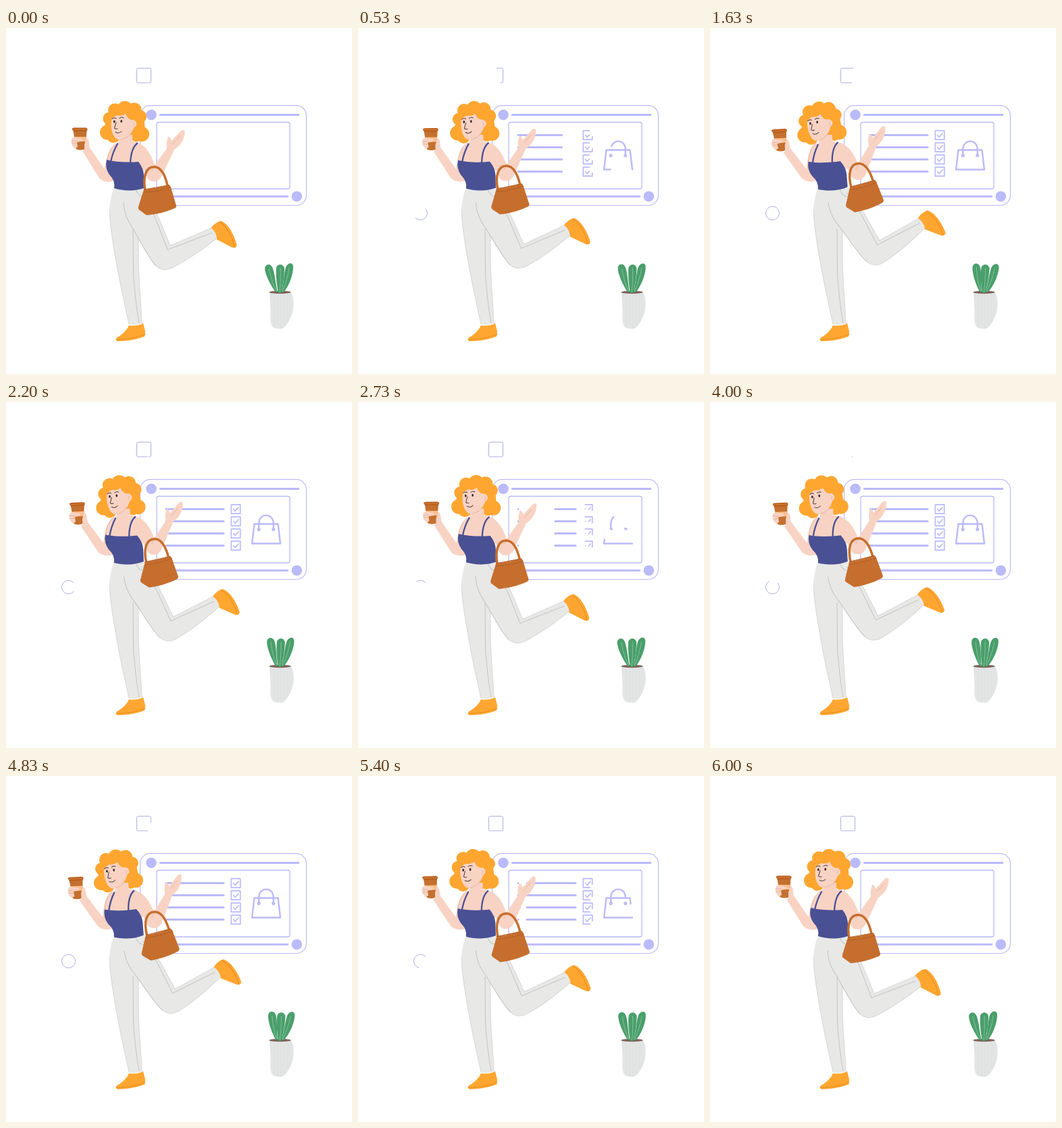
Recreate the animation shown at these times as an HTML page. Size 512 by 512 pixels, loop 6.03 s.

```html
<!DOCTYPE html>
<html lang="en">
<head>
<meta charset="utf-8">
<title>Shopping list</title>
<style>
html, body { margin: 0; width: 100%; height: 100%; overflow: hidden; background: #fff; }
svg { display: block; width: 100vmin; height: 100vmin; }
.line { fill: none; stroke: #bbbafa; stroke-linecap: round; stroke-linejoin: round; }
.thin { fill: none; stroke: #aeaee8; stroke-width: 1; }
.skin { fill: #f8d3c4; }
.hair { fill: #ffa630; }
.pants { fill: #e8e8e7; }
.edge { fill: none; stroke: #d6d7d6; stroke-width: 1; }
.seam { fill: none; stroke: #c6c8c7; stroke-width: 1.1; }
.shoe { fill: #ffa630; }
.sole { fill: none; stroke: #e58f20; stroke-width: 1; }
.ink { fill: none; stroke: #4b3a3c; stroke-width: 1; stroke-linecap: round; stroke-linejoin: round; }
.fold { fill: none; stroke: #e2b19d; stroke-width: .9; stroke-linecap: round; }
.navy { fill: #495094; }
.strap { fill: none; stroke: #495094; stroke-width: 2.3; }
.bag { fill: #c66e2d; }
.leaf { fill: #4a9f6b; }
.vein { fill: none; stroke: #8fc6a4; stroke-width: .8; }
</style>
</head>
<body>
<svg viewBox="0 0 512 512">
  <path id="square" class="thin" pathLength="1" d="M210 81H195.500Q193.500 81 193.500 79V61.500Q193.500 59.500 195.500 59.500H212.500Q214.500 59.500 214.500 61.500V79Q214.500 81 212.500 81H210"/>
  <path id="ring" class="thin" pathLength="1" d="M100.200 267.600A10 10 0 1 1 84.800 280.400A10 10 0 1 1 100.200 267.600"/>

  <g class="line">
    <rect x="198.500" y="114.700" width="246" height="147.800" rx="15" stroke-width="1.200"/>
    <rect x="223" y="139.500" width="197" height="98.500" rx="3" stroke-width="1.300"/>
    <path stroke-width="3" stroke-linecap="butt" d="M227 128.500H434M227 249.300H418"/>
    <g fill="#bbbafa" stroke="none"><circle cx="215" cy="128.500" r="7.800"/><circle cx="430.300" cy="249.300" r="7.800"/></g>
  </g>
  <g id="list" class="line"></g>

  <path fill="#e3e5e5" d="M390 391H422C426 398 427 411 424 421C421 432 416 439 411 444Q404 446 397 444C391 440 391 434 391.500 420Z"/>
  <path fill="none" stroke="#dcdedf" stroke-width="1" d="M397 394V441M402 394V444M407 394V444M412 394V441M417 394V434M421 394V424"/>
  <ellipse cx="405.500" cy="391" rx="16" ry="2.200" fill="#7f6058"/>
  <g data-turn="8.500 402 392">
    <path class="leaf" d="M399 391C391 380 383 364 383 355C385 348 392 349 394.500 355C398 364 399 380 402 391Z"/>
    <path class="vein" d="M389 356Q393 376 400 389"/>
  </g>
  <g data-turn="3.800 410 392">
    <path class="leaf" d="M407 391C411 382 411 363 414 354C417 347 425 346 425 354C425 366 418 383 411 391Z"/>
    <path class="vein" d="M419 355Q416 375 409 390"/>
  </g>
  <g data-turn="2.500 405 392">
    <path class="leaf" d="M403 392C400 378 399 362 400 354C403 348 410 349 412 355C412 367 410 381 407 392Z"/>
    <path class="vein" d="M406 355Q407 376 405 391"/>
  </g>

  <g class="hair" data-turn="-7.700 175 230">
    <circle cx="150" cy="154.500" r="11"/><circle cx="159" cy="160" r="10"/>
    <circle cx="153" cy="134" r="9.500"/><circle cx="161" cy="121.500" r="10"/>
    <circle cx="176" cy="119.500" r="11.500"/><circle cx="190" cy="121" r="10.500"/>
    <circle cx="198.500" cy="131" r="9.500"/><circle cx="201" cy="157" r="11"/>
    <circle cx="193" cy="160" r="8.500"/><path d="M150 130H204L206 152L190 162H158L145 150Z"/>
  </g>

  <path class="pants" d="M161 235C153 250 152 272 154 290C158 322 165 360 171 388L182 438Q191 441 201 437C200 410 196 370 196 345V290L206 236Z"/>
  <path class="edge" d="M153.500 268C152 290 166 362 171 388L182 438M196 300V345C196 370 200 410 201 437"/>
  <path class="seam" d="M188 297L188.500 365Q191 402 197 437"/>
  <path class="shoe" d="M182 440Q193 442 203 437L206 449L205.500 456C197 460 184 463 165 463.500Q161 462 164 458C170 455 178 449 182 440Z"/>
  <path class="sole" d="M163 461C180 461 194 458 206 453"/>

  <g data-turn="-6.500 180 250">
    <path class="shoe" d="M303 296Q309 288 318 285.500C329 289 338 307 341.500 321Q341.500 326 335 325L312 313Z"/>
    <path class="sole" d="M316 287C325 291 335 308 338 325"/>
    <path class="pants" d="M173 244C172 268 178 284 188 297C200 318 212 342 222 352Q233 361 245 355C272 342 294 325 312 311Q311 302 304 296L243 322L226 281L206 240Q190 225 173 244Z"/>
    <path class="edge" d="M222 352Q233 361 245 355C272 342 294 325 312 311M206 244L226 281L243 322L304 296"/>
    <path class="seam" d="M174 258C175 276 181 287 188 297C200 318 212 342 222 352M203 246L221 281L239 328L305 303"/>
  </g>
  <path class="seam" d="M192 239Q195 248 204 250"/>

  <g data-turn="-3.400 142 264">
    <path class="skin" d="M113 182L124 177L146 209C148 194 152 176 163 171L166 222C158 230 145 229 138 222Z"/>
    <path class="fold" d="M163 171C155 175 150 188 149 203"/>
    <path fill="#c4702f" d="M99.500 152H119.500L117.500 179Q110 182 103.500 179Z"/>
    <path fill="#fbc08f" d="M100.300 161H118.700L118 168H101Z"/>
    <path fill="#b9601f" d="M97.500 149.500Q98 147.500 101 147.500H118Q121 148 120.500 151L118.500 153H100Z"/>
    <path fill="none" stroke="#d8843f" stroke-width="1" d="M99 150H119"/>
    <path class="skin" d="M98 163Q101 160 106 163L113 164Q115 167 110 168L105 169L106 176L102 178C97 175 95 168 98 163ZM116 181L116 172L119 163Q123 164 123 171L124 178Z"/>
    <path class="fold" d="M98 167H105M98 171H105"/>
  </g>

  <g data-turn="-4.600 182 240">
    <path class="skin" d="M162 171Q169 170 169 158H187V168Q198 169 204 175L214 200L203 212L151 205C152 187 155 175 162 171Z"/>
    <path class="strap" d="M155 198Q158 183 165.500 170.500M184 200Q185 177 195 170"/>
    <path class="navy" d="M149 195C165 199 182 199 196 198Q204 208 204 219V237C190 242 173 241 160 237Q162 226 153 217Q146 207 149 195Z"/>
  </g>

  <g data-turn="-7.700 175 230">
    <path class="skin" d="M157 131C154 143 156 157 162 163C169 169 180 162 186 154L193 141Q190 134 180 130L176 126Z"/>
    <circle class="skin" cx="188.500" cy="142" r="4.600"/>
    <path class="hair" d="M153 136Q158 133 164 129Q174 131 177 126C179 133 183 137 190 136L200 132L190 116H165Z"/>
    <path class="fold" d="M188 140Q191 141 188 145M170 165Q180 163 186 155"/>
    <path class="ink" d="M157 134.500Q160 132 163 134M168 133.500Q171 131 174 133M163 140L160.500 148Q162 150 165 149M162 154Q167 157 171 153"/>
    <ellipse cx="160.300" cy="138.500" rx="1.400" ry="2" fill="#3b2a2c"/><ellipse cx="170.700" cy="138" rx="1.400" ry="2" fill="#3b2a2c"/>
  </g>

  <g data-turn="-4.900 192 212">
    <path class="skin" d="M195 170C208 174 215 188 220 203L238 178C237 172 238 167 240 161Q243 160 245 167L258 153Q262 149 264.500 152C265 163 259 174 249 180L231 218C226 230 213 229 209 222L199 197Z"/>
    <path class="fold" d="M220 203Q219 208 216 211M247 171L257 160"/>
  </g>

  <g data-turn="-5.200 163 203">
    <path fill="none" stroke="#c66e2d" stroke-width="3.500" d="M206 241C202 218 208 205.500 219 205.500C230 205.500 236 218 239.500 236"/>
    <path class="bag" d="M204 239Q225 237 239 232Q243 232 244 236L252 263Q252 266 249 267C235 273 221 276 208 277L197 269Q195 267 196 264Z"/>
    <path fill="none" stroke="#b2602a" stroke-width="1.100" d="M203 243Q226 242 244 236M204 239L242 232.500"/>
  </g>
</svg>
<script>
const LOOP = 6030, CYCLE = LOOP / 2;
const $ = id => document.getElementById(id);
const clamp = x => Math.min(1, Math.max(0, x));

const list = $('list');
const add = (d, width) => list.insertAdjacentHTML('beforeend',
  `<path pathLength="1" stroke-width="${width}" d="${d}"/>`);

for (let i = 0; i < 4; i++) {
  const y = 158.5 + 18 * i;
  add(`M237 ${y}H322`, 3);
  add(`M346.700 ${y + 2}v4.700h-13.400v-13.400h13.400v8.700`, 1.7);
  add(`M336.500 ${y}l2.500 3l5 -5.500`, 1.7);
}
// shopping bag: body, handle, rivets
add('M406 209.500L402.500 180.500H367.500L364 209.500H406', 2.4);
add('M395.800 187V180C395.800 163.500 374.200 163.500 374.200 180V187', 2.4);
for (const x of [374.2, 395.8]) add(`M${x + 1.4} 188.700a1.400 1.400 0 1 1 -2.800 0a1.400 1.400 0 1 1 2.800 0`, 2.4);

const strokes = [...list.children];
const turning = [...document.querySelectorAll('[data-turn]')].map(el => {
  const [angle, x, y] = el.dataset.turn.split(' ').map(Number);
  return { el, angle, x, y };
});

// Show only the part of a path between two fractions of its length.
function trim(el, from, to) {
  el.style.visibility = to - from > 0.004 ? 'visible' : 'hidden';
  el.setAttribute('stroke-dasharray', to - from > 0.999 ? 'none' : `0 ${from} ${to - from} 2`);
}

function draw() {
  const p = performance.now() % LOOP % CYCLE;
  const sway = (1 - Math.cos(2 * Math.PI * p / CYCLE)) / 2;
  for (const { el, angle, x, y } of turning)
    el.setAttribute('transform', `rotate(${angle * sway} ${x} ${y})`);

  for (const el of strokes) trim(el, clamp((p - 2280) / 700), clamp(p / 700));

  trim($('ring'), clamp((p - 2000) / 960), 1 - (1 - clamp(p / 1850)) ** 2);

  const u = p / 1005;
  if (u < 1) trim($('square'), clamp(u + 0.06 * Math.sin(Math.PI * u)), 1);
  else trim($('square'), 0, 1 - (1 - clamp((p - 1005) / 1300)) ** 1.7);

  requestAnimationFrame(draw);
}
draw();
</script>
</body>
</html>
```
